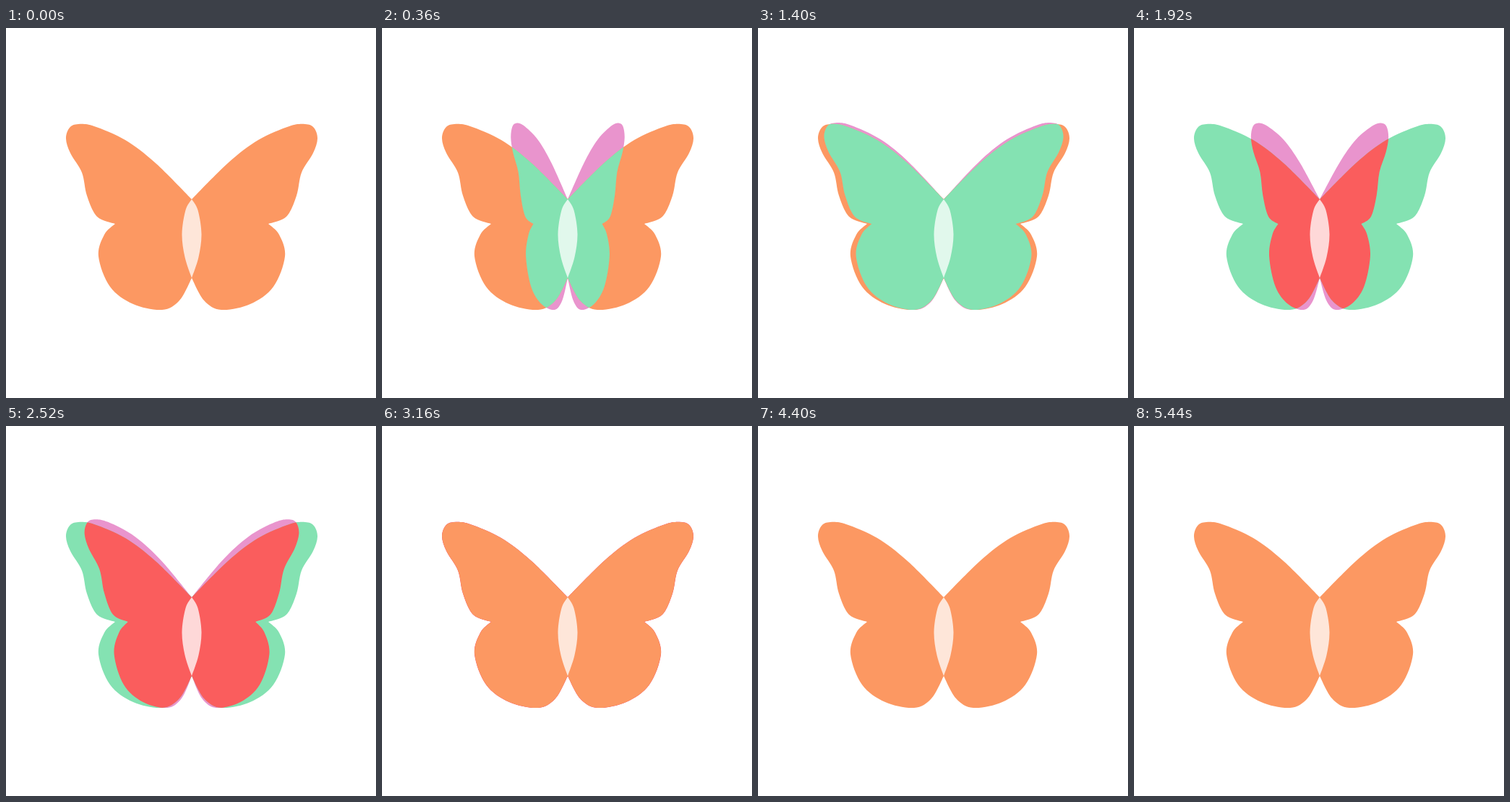
Animation of 512 by 512 pixels, one loop 5.8 s. Source, as an HTML page:

```html
<!DOCTYPE html>
<html lang="en">
<head>
<meta charset="utf-8">
<title>Butterfly</title>
<style>
  html, body { margin: 0; width: 100%; height: 100%; overflow: hidden; background: #fff; }
  svg { display: block; width: 100vw; height: 100vh; }
</style>
</head>
<body>
<svg viewBox="0 0 512 512">
  <defs>
    <path id="full"/>
    <path id="fold"/>
    <g id="fullPair">
      <use href="#full"/>
      <use href="#full" transform="matrix(-1 0 0 1 514 0)"/>
    </g>
    <g id="foldPair">
      <use href="#fold"/>
      <use href="#fold" transform="matrix(-1 0 0 1 514 0)"/>
    </g>
    <clipPath id="inside">
      <use href="#full"/>
      <use href="#full" transform="matrix(-1 0 0 1 514 0)"/>
    </clipPath>
  </defs>
  <use id="shade" href="#foldPair" fill="#e994cd"/>
  <use id="base" href="#fullPair"/>
  <g clip-path="url(#inside)"><use id="front" href="#foldPair"/></g>
  <path id="lens" fill="#fff" fill-opacity=".76"/>
</svg>
<script>
const LOOP = 5800;
const FLAP = 422;
const MID = 257;
const ORANGE = '#fc9862', GREEN = '#84e2b2', RED = '#fa5d5d';

// Key points of one wing: distance from the body axis, y
const UPPER = [[0, 237], [50, 187], [92, 155], [135, 136], [157, 133], [169, 138], [174, 153],
  [168, 173], [152, 200], [145, 232], [131, 261], [106, 271]];
const LOWER = [[106, 271], [121, 286], [129, 316], [113, 358], [81, 382], [41, 390], [17, 377], [0, 346]];
const INNER = [[0, 346], [-9.5, 317], [-13.5, 285], [-8.5, 252], [0, 237]];

// In each act a new colour opens over the last one, then flaps
const ACTS = [
  { color: GREEN, start: 0, open: 178, flaps: 3 },
  { color: RED, start: 1500, open: 260, flaps: 2 },
  { color: ORANGE, start: 2970, open: 208, flaps: 2 }
];

const $ = id => document.getElementById(id);
const cosDeg = a => Math.cos(a * Math.PI / 180);

// Smooth curve through points, as cubic segments
function curve(pts) {
  let d = '';
  for (let i = 0; i + 1 < pts.length; i++) {
    const [a, b, c, e] = [pts[i - 1] || pts[i], pts[i], pts[i + 1], pts[i + 2] || pts[i + 1]];
    const out = [0, 1].map(k => b[k] + (c[k] - a[k]) / 6);
    const into = [0, 1].map(k => c[k] - (e[k] - b[k]) / 6);
    d += 'C' + [...out, ...into, ...c].map(v => v.toFixed(2)).join(' ');
  }
  return d;
}

const place = ([x, y]) => [MID - x, y];

// w is the visible width of the wing; its tip rises a little while it turns
function wingPath(w) {
  const lift = Math.min(1.5, 12 * (1 - w)) + (w < 1 ? 3.5 * Math.exp(-(((w - 0.87) / 0.07) ** 2)) : 0);
  const turn = ([x, y]) => {
    const high = Math.max(0, (271 - y) / 138);
    return place([x * w * (1 + 0.008 * lift * high * high), y - lift * high * x / 174]);
  };
  return 'M257 237' + curve(UPPER.map(turn)) + curve(LOWER.map(turn)) + curve(INNER.map(place)) + 'Z';
}

function widthAt(act, t) {
  if (t < act.open) return cosDeg(90 * (1 - t / act.open) ** 1.3);
  const n = (t - act.open) / FLAP;
  if (n >= act.flaps) return 1;
  const fold = 1 - Math.abs(1 - 2 * (n % 1));
  return cosDeg(71 * fold ** 0.8);
}

function draw(t) {
  const i = ACTS.filter(a => a.start <= t).length - 1;
  const act = ACTS[i];
  const w = widthAt(act, t - act.start);
  const back = ACTS[(i + ACTS.length - 1) % ACTS.length].color;
  const shown = w > 0.1 && w < 1 ? 'visible' : 'hidden';
  $('base').setAttribute('fill', w === 1 ? act.color : back);
  $('front').setAttribute('fill', act.color);
  $('front').setAttribute('visibility', shown);
  $('shade').setAttribute('visibility', shown);
  $('fold').setAttribute('d', wingPath(w));
}

$('full').setAttribute('d', wingPath(1));
$('lens').setAttribute('d', 'M257 346' + curve(INNER.map(([x, y]) => [MID - x, y])) +
  curve(INNER.map(([x, y]) => [MID + x, y]).reverse()) + 'Z');

const begin = performance.now();
function tick() {
  draw((performance.now() - begin) % LOOP);
  requestAnimationFrame(tick);
}
tick();
</script>
</body>
</html>
```
